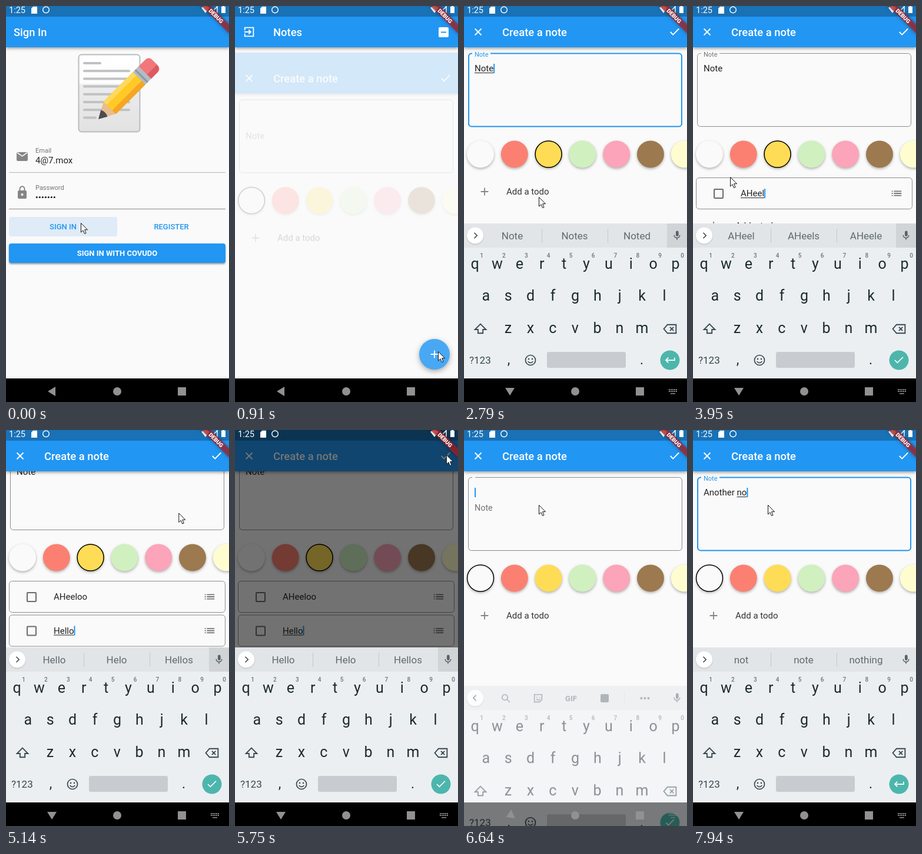
Recreate the animation shown at these times as an HTML page with a canvas. Size 379 px wide and 672 px high, loop 8 s.

```html
<!DOCTYPE html>
<html lang="en">
<head>
<meta charset="utf-8">
<title>Notes app</title>
<style>
html, body { margin: 0; width: 100%; height: 100%; overflow: hidden; background: #fafafa; }
canvas { display: block; }
</style>
</head>
<body>
<canvas id="stage" width="379" height="672"></canvas>
<script>
const W = 379, H = 672, LOOP = 8000;
const BLUE = '#2196f3', BG = '#fafafa', GREY = '#757575', KEY = '#1c2a30';
const main = document.getElementById('stage').getContext('2d');
const spare = Object.assign(document.createElement('canvas'), { width: W, height: H }).getContext('2d');
let c = main;

const ICON = {
  close: 'M6 6l12 12M18 6L6 18',
  check: 'M4 12l5 5L20 6',
  add: 'M5 12h14M12 5v14',
  exit: 'M4 9V4h16v16H4v-5M3 12h12M11 8l4 4-4 4',
  list: 'M3 8h2M3 12h2M3 16h2M7 8h14M7 12h14M7 16h14',
  shift: 'M12 4l9 9h-5v6H8v-6H3z',
  erase: 'M8 5h14v14H8l-6-7zM12 9l6 6M18 9l-6 6',
  enter: 'M21 7v5H4M9 7l-5 5 5 5',
  search: 'M10 4a6 6 0 1 0 .1 0M14.5 14.5l6 6',
  sticker: 'M4 4h16v11l-5 5H4zM9 9v2M15 9v2M8 14q4 3 8 0',
  left: 'M14 6l-6 6 6 6',
  right: 'M10 6l6 6-6 6'
};

// Timing
const clamp = t => Math.max(0, Math.min(1, t));
const lerp = (a, b, t) => a + (b - a) * t;
const ramp = (t, start, length) => clamp((t - start) / length);
const bezier = (x1, y1, x2, y2) => t => {
  if (t <= 0 || t >= 1) return clamp(t);
  const at = (m, p, q) => 3 * (1 - m) * (1 - m) * m * p + 3 * (1 - m) * m * m * q + m ** 3;
  let lo = 0, hi = 1;
  for (let i = 0; i < 20; i++) {
    const m = (lo + hi) / 2;
    if (at(m, x1, x2) < t) lo = m; else hi = m;
  }
  return at(lo, y1, y2);
};
const ease = bezier(.4, 0, .2, 1), easeIn = bezier(.42, 0, 1, 1);
const typed = (s, t, start, step) => s.slice(0, Math.max(0, Math.floor((t - start) / step) + 1));
const blink = (t, start) => Math.floor((t - start) / 490) % 2 <= 0;

// Drawing helpers
function paint(fill, stroke, lw = 1, path) {
  if (fill) { c.fillStyle = fill; path ? c.fill(path) : c.fill(); }
  if (stroke) { c.strokeStyle = stroke; c.lineWidth = lw; path ? c.stroke(path) : c.stroke(); }
}
function box(x, y, w, h, r, fill, stroke, lw) {
  c.beginPath();
  c.roundRect(x, y, w, h, r);
  paint(fill, stroke, lw);
}
function disc(x, y, r, fill, stroke, lw) {
  c.beginPath();
  c.arc(x, y, r, 0, 7);
  paint(fill, stroke, lw);
}
function shape(d, x, y, scale, fill, stroke, lw) {
  c.save();
  c.translate(x, y);
  c.scale(scale, scale);
  paint(fill, stroke, lw, new Path2D(d));
  c.restore();
}
function icon(d, x, y, color, size = 22, lw = 2) {
  shape(d, x - size / 2, y - size / 2, size / 24, null, color, lw);
}
function txt(s, x, y, size, color, weight = 400, align = 'left') {
  c.font = `${weight} ${size}px Roboto, sans-serif`;
  c.textAlign = align;
  c.fillStyle = color;
  c.fillText(s, x, y);
}
function shaded(dy, blur, alpha, draw) {
  c.save();
  c.shadowColor = `rgba(0,0,0,${alpha})`;
  c.shadowBlur = blur;
  c.shadowOffsetY = dy;
  draw();
  c.restore();
}
function layer(alpha, dy, draw) {
  if (alpha <= 0) return;
  if (alpha >= 1 && !dy) return draw();
  const under = c;
  c = spare;
  c.clearRect(0, 0, W, H);
  draw();
  c = under;
  c.globalAlpha = alpha;
  c.drawImage(spare.canvas, 0, dy);
  c.globalAlpha = 1;
}
const route = (t, draw) => layer(easeIn(t), 168 * (1 - ease(t)), draw);

// Shared parts
function appBar(title, x) {
  shaded(2, 5, .4, () => box(0, 0, W, 70, 0, BLUE));
  txt(title, x, 51, 18.4, '#fff', 500);
}
function input(text, x, y, focus, caret) {
  txt(text, x, y, 15, '#222');
  if (!focus) return;
  const width = c.measureText(text).width;
  const word = c.measureText(text.split(' ').pop()).width;
  box(x + width - word, y + 2, word, 1, 0, '#222');
  if (caret) box(x + width, y - 13, 2, 16, 0, BLUE);
}
function statusBar() {
  box(0, 0, W, 18, 0, 'rgba(0,0,0,.25)');
  txt('1:25', 5, 12, 14.5, '#fff');
  shape('M3 0h7v12H0V3z', 43, 1, 1, '#fff');
  disc(68, 6.5, 5.3, null, '#fff', 1.4);
  shape('M0 3q7-6 14 0L7 12z', 332, 0, 1, '#fff');
  shape('M11 1v10H1z', 348, 0, 1, null, '#fff', 1.5);
  shape('M2 0h3v1h2v11H0V1h2z', 366, 0, 1, '#fff');
}
function banner() {
  c.save();
  c.translate(W, -5);
  c.rotate(Math.PI / 4);
  shaded(0, 6, .5, () => box(-40, 25.5, 80, 11, 0, 'rgba(183,28,28,.68)'));
  txt('DEBUG', 0, 34.5, 9.5, '#fff', 900, 'center');
  c.restore();
}
function navBar(k) {
  c.save();
  c.translate(78, 654);
  c.rotate(-Math.PI / 2 * k * k);
  shape('M-7 0L6-8V8z', 0, 0, 1, '#919191');
  c.restore();
  disc(189, 654, 7, '#919191');
  box(292, 647, 14, 14, 0, '#919191');
  c.globalAlpha = k;
  for (let i = 0; i < 10; i++) box(348 + i % 5 * 3, 650 + (i > 4) * 3, 2, 2, 0, '#919191');
  box(351, 657, 8, 1.5, 0, '#919191');
  c.globalAlpha = 1;
}

// Pages
function memo() {
  const paper = c.createLinearGradient(0, 82, 0, 214);
  [[0, '#fff'], [.37, '#fdfdfd'], [.39, '#ececec'], [1, '#e2e2e2']].forEach(s => paper.addColorStop(...s));
  box(123.5, 82.5, 104, 131, 5, paper, '#b9bbbd', 2);
  for (let i = 0; i < 8; i++) {
    const w = i == 0 ? 31 : i == 7 ? 23 : 80;
    box(131, 95 + i * 13.2, w, 4, 2, '#c0c1c3');
  }
  c.save();
  c.translate(157, 192);
  c.rotate(-Math.PI / 4);
  shape('M0 0L28-15V15z', 0, 0, 1, '#e8bd91');
  shape('M0 0L14-8Q18 0 14 8z', 0, 0, 1, '#4c4c4f');
  box(27, -15, 72, 30, 2, '#ffca28');
  box(27, -15, 72, 8, 2, '#ffd95c');
  box(27, 6, 72, 9, 2, '#f5a623');
  box(111, -15, 25, 30, [0, 8, 8, 0], '#f2777a');
  box(111, 5, 24, 10, [0, 0, 8, 0], '#dd5a60');
  box(98, -15, 14, 30, 1, '#b3bcc2');
  box(102, -15, 3, 30, 0, '#8c989f');
  c.restore();
}
function signIn() {
  box(0, 0, W, H, 0, BG);
  appBar('Sign In', 13);
  memo();
  box(18, 248, 19, 15, 2, '#858585');
  icon('M2 6l10 7 10-7', 27.5, 254, BG, 20);
  txt('Email', 50, 249, 11, GREY);
  txt('4@7.mox', 50, 267, 15, '#222');
  box(5, 282, 368, 1, 0, '#b5b5b5');
  box(20, 313, 15, 14, 2, '#858585');
  icon('M7 11V6a5 5 0 0 1 10 0v5', 27.5, 315, '#858585', 19, 2.5);
  disc(27.5, 320, 2, BG);
  txt('Password', 50, 312, 11, GREY);
  for (let i = 0; i < 7; i++) disc(52.3 + i * 5, 324.5, 1.6, '#222');
  box(5, 344, 368, 1, 0, '#888');
  box(5, 358, 184, 33, 4, '#dfebf7');
  txt('SIGN IN', 97, 379, 13, BLUE, 500, 'center');
  txt('REGISTER', 281, 379, 13, BLUE, 500, 'center');
  shaded(2, 3, .4, () => box(5, 403, 368, 33, 4, BLUE));
  txt('SIGN IN WITH COVUDO', 189, 424, 13, '#fff', 700, 'center');
}
function notes(saved) {
  box(0, 0, W, H, 0, BG);
  appBar('Notes', 65);
  icon(ICON.exit, 24, 44, '#fff');
  box(346, 36, 17, 17, 2, '#fff');
  box(350, 43.5, 9, 2, 0, BLUE);
  if (saved) {
    shaded(1, 3, .3, () => box(7, 78, 364, 96, 5, '#ffdc55'));
    txt('Note', 18, 102, 15, '#222');
    ['AHeeloo', 'Hello'].forEach((s, i) => {
      box(19, 116 + i * 26, 13, 13, 1, null, '#6b6b6b', 2);
      txt(s, 44, 128 + i * 26, 15, '#222');
    });
  }
  shaded(3, 8, .4, () => disc(339, 591, 26, BLUE));
  icon(ICON.add, 339, 591, '#fff');
}
const COLORS = [BG, '#fb8072', '#ffdc55', '#d0f0c0', '#fca4b9', '#9c794f', '#fffdd0'];
function create(s) {
  box(0, 0, W, H, 0, BG);
  c.save();
  c.translate(0, -s.scroll);
  box(7.5, 80.5, 363, 124, 5, null, '#8c8c8c');
  c.globalAlpha = s.focus * s.focus;
  box(8, 80.5, 362, 124, 5, null, BLUE, 2);
  c.globalAlpha = 1;
  box(14, 78, 31 * s.float, 5, 0, BG);
  txt('Note', 18, lerp(147, 85.5, s.float), lerp(15, 11, s.float), s.focus > .5 ? BLUE : GREY);
  input(s.text, 18, 111, s.focus > .1, s.caret);
  COLORS.forEach((color, i) => {
    const x = 28 + 57.8 * i;
    shaded(2, 4, .3, () => disc(x, 251.5, 23, color));
    if (i == s.pick) disc(x, 251.5, 22.5, null, '#000', 1.5);
  });
  s.todos.forEach((todo, i) => {
    const y = 318 + 57.5 * i;
    box(5.5, y - 26.5, 367, 53, 5, null, '#8c8c8c');
    box(36, y - 7, 15, 15, 1, null, '#6b6b6b', 2);
    input(todo, 81, y + 5, i == s.todos.length - 1, s.caret);
    icon(ICON.list, 346, y, GREY);
  });
  const y = 315 + 57.5 * s.todos.length;
  icon(ICON.add, 35, y, '#858585');
  txt('Add a todo', 72, y + 5, 15, '#333');
  c.restore();
  appBar('Create a note', 65);
  icon(ICON.close, 24, 44, '#fff');
  icon(ICON.check, 358, 44, '#fff');
}

// Keyboard
const WORDS = {
  Note: ['Note', 'Notes', 'Noted'],
  Hello: ['Hello', 'Helo', 'Hellos'],
  no: ['not', 'note', 'nothing'],
  AHeeloo: ['AHeeloo', 'Ahello', 'Aheeloo'],
  Another: ['Another', 'Anothers', 'Other'],
  '': ['one', 'day', 'thing']
};
function strip(word, micLit) {
  const tone = '#66727a';
  box(0, 369, W, 41, 0, '#e2e5e8');
  if (micLit) box(345, 369, 34, 41, 0, '#d0d4d7');
  shaded(1, 2, .2, () => disc(19, 389.5, 14, '#fff'));
  icon(word == null ? ICON.left : ICON.right, 19, 389.5, '#37474f', 19);
  if (word == null) {
    icon(ICON.search, 71, 390, tone, 19);
    icon(ICON.sticker, 126, 390, tone, 19);
    txt('GIF', 182, 395, 13, tone, 700, 'center');
    box(232, 383, 14, 14, 2, tone);
    box(272, 378, 1, 24, 0, '#cfd3d6');
    for (let i = 0; i < 3; i++) disc(301.5 + i * 6, 390, 2, tone);
  } else {
    const list = WORDS[word] || [word, word + 's', word + 'e'];
    list.forEach((w, i) => txt(w, 82 + i * 106, 396, 17, '#5f6b70', 400, 'center'));
    box(132, 378, 1, 24, 0, '#c3c8cb');
    box(244, 378, 1, 24, 0, '#c3c8cb');
  }
  shape('M9 5a3 3 0 0 1 6 0v6a3 3 0 0 1-6 0z', 353, 380, .78, '#55626a');
  icon('M6 11a6 6 0 0 0 12 0M12 17v4', 362, 389.5, '#55626a', 19);
}
function keyboard(s) {
  box(0, 369, W, 263, 0, '#ebeff1');
  strip(s.word, s.micLit);
  ['qwertyuiop', 'asdfghjkl', 'zxcvbnm'].forEach((row, r) => [...row].forEach((key, i) => {
    const x = [18.5, 37.3, 75][r] + 37.9 * i;
    txt(key, x, 445.5 + 54.7 * r, 25, KEY, 400, 'center');
    if (!r) txt((i + 1) % 10, x + 11.5, 427, 10, '#68757b', 500, 'center');
  }));
  icon(ICON.shift, 28, 548, '#37474f', 25, 1.8);
  icon(ICON.erase, 350, 548, '#37474f', 25, 1.8);
  txt('?123', 9, 607, 17, '#37474f');
  txt(',', 76, 608, 23, KEY, 400, 'center');
  disc(113, 601, 8.5, null, '#37474f', 1.7);
  disc(110, 599, 1.3, '#37474f');
  disc(116, 599, 1.3, '#37474f');
  shape('M0 0q4.500 5 9 0', 108.5, 603, 1, null, '#37474f', 1.6);
  box(141, 587, 134, 27, 3, '#c8ccd0');
  txt('.', 302, 608, 23, KEY, 400, 'center');
  disc(350, 601, 16.5, '#4db6ac');
  icon(s.done ? ICON.check : ICON.enter, 350, 601, '#fff', 21);
}

// Pointer stops: time, x, y
const STOPS = [
  [0, 127, 368], [200, 127, 368], [700, 345, 586], [1000, 345, 586], [1250, 199, 150],
  [1350, 199, 150], [1550, 199, 243], [2150, 199, 243], [2230, 150, 243], [2420, 150, 243],
  [2700, 127, 324], [3000, 127, 324], [3180, 117, 321], [3260, 63, 290], [4960, 63, 290],
  [5140, 293, 141], [5400, 359, 42], [5950, 359, 42], [6190, 345, 586], [6300, 345, 586],
  [6560, 127, 127], [8000, 127, 127]
];
function pointer(t) {
  const i = STOPS.findIndex(stop => stop[0] > t);
  const [t0, x0, y0] = STOPS[i - 1], [t1, x1, y1] = STOPS[i];
  const k = (t - t0) / (t1 - t0);
  shape('M.5.500V16L4 12.700 6.500 18.500 9 17.500 6.600 11.700H11.500z',
    lerp(x0, x1, k), lerp(y0, y1, k), 1, '#fff', '#111', 1);
}

function state(t) {
  const again = t >= 6200;
  const text = again ? typed('Another no', t, 7320, 68) : typed('Note', t, 1650, 113);
  const float = ease(again ? ramp(t, 6605, 167) : ramp(t, 1350, 167));
  const todos = [];
  if (!again && t >= 3410) todos.push(typed('AHeeloo', t, 3560, 86));
  if (!again && t >= 4390) todos.push(typed('Hello', t, 4620, 55));
  const current = todos.length ? todos[todos.length - 1] : text;
  const hinted = again || todos.length ? current : current.length > 2;
  const blinkStart = again ? (t < 7320 ? 6600 : 7940) : t < 3410 ? 1670 : t < 4390 ? 4080 : 4700;
  return {
    text, float, todos,
    focus: again ? float : float - ease(ramp(t, 3410, 167)),
    scroll: again ? 0 : 35 * ramp(t, 4370, 80),
    pick: !again && t >= 2410 ? 2 : 0,
    caret: blink(t, blinkStart),
    word: hinted ? current.split(' ').pop() : null,
    done: t >= 3410 && t < 6720,
    micLit: t < 5850
  };
}

function frame() {
  const t = performance.now() % LOOP, s = state(t);
  const opened = t < 5930 ? ramp(t, 802, 300) : t < 6200 ? 1 - ramp(t, 5930, 200) : ramp(t, 6230, 250);
  const keys = t < 5850 ? ramp(t, 1400, 160) : t < 6200 ? 1 - ramp(t, 5850, 110) : ramp(t, 6560, 160);
  const dim = .54 * (ramp(t, 5640, 100) - ramp(t, 5850, 100));

  if (t < 620) signIn();
  route(ramp(t, 300, 300), () => notes(t > 5800));
  route(opened, () => create(s));
  if (dim > 0) box(0, 0, W, H, 0, `rgba(0,0,0,${dim})`);
  statusBar();
  banner();
  box(0, 632, W, 40, 0, '#000');
  layer(keys, 132 * (1 - keys), () => keyboard(s));
  navBar(keys);
  pointer(t);
  requestAnimationFrame(frame);
}
frame();
</script>
</body>
</html>
```
